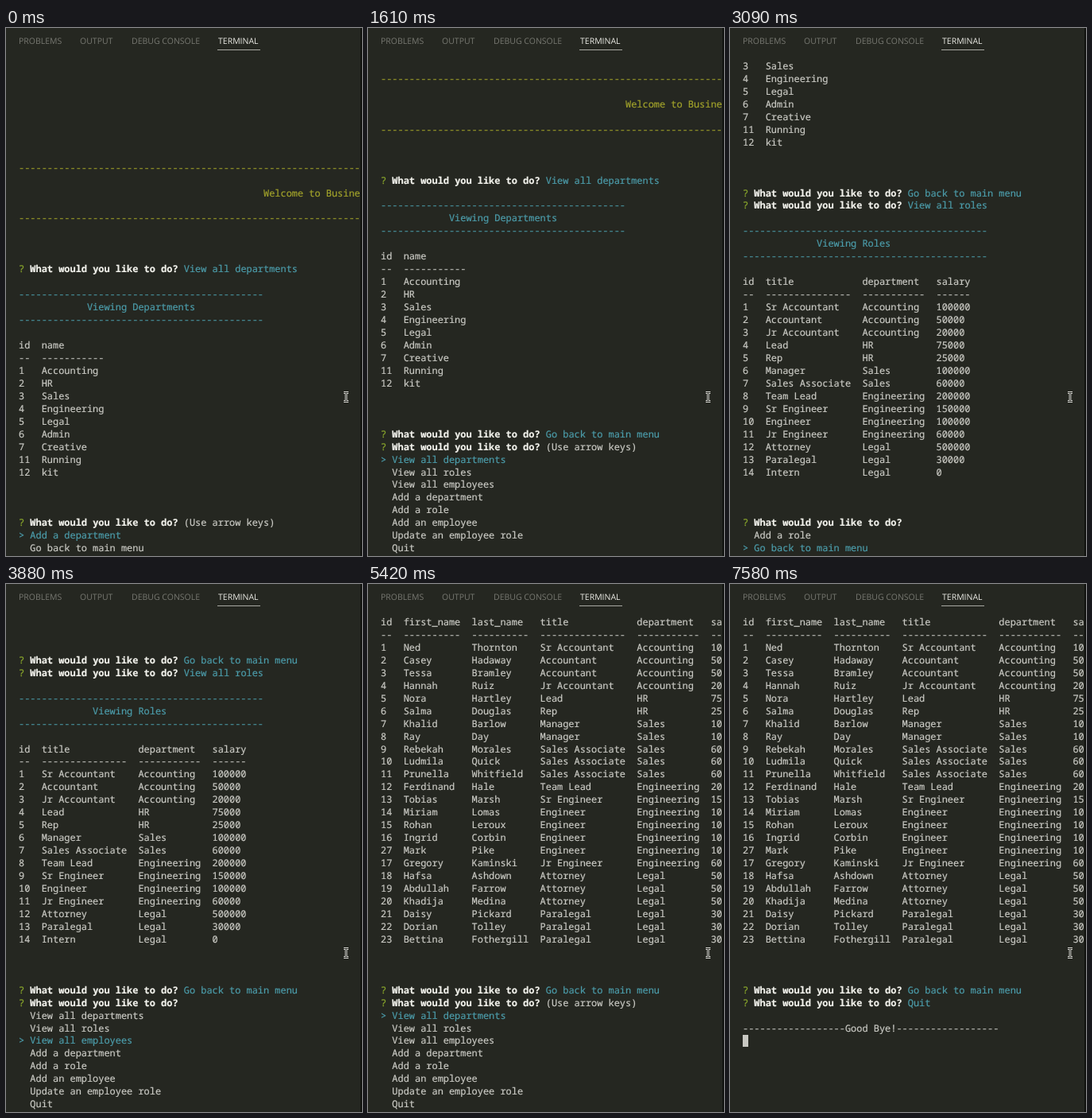
Animation, 448 px wide and 664 px high, one loop 7610 ms. Source, as an HTML page:

```html
<!DOCTYPE html>
<html lang="en">
<head>
<meta charset="utf-8">
<title>Terminal session</title>
<style>
  html, body { margin: 0; width: 100%; height: 100%; overflow: hidden; background: #252721; }
  #stage { position: relative; width: 448px; height: 664px; overflow: hidden; text-rendering: geometricPrecision; }
  .tab { position: absolute; top: 9px; font: 10.5px/16px "Open Sans", "Noto Sans", sans-serif; color: #777871; white-space: nowrap; }
  .tab.on { color: #ececE6; }
  .rule { position: absolute; left: 266px; top: 27px; width: 54px; height: 1px; background: #a8a9a2; }
  #term {
    position: absolute; left: 16px; top: 40px; width: 430px; height: 624px; margin: 0; overflow: hidden;
    font: 11.95px/15.95px "Noto Sans Mono", "DejaVu Sans Mono", monospace; color: #cbcbc5; white-space: pre;
    font-variant-ligatures: none; -webkit-text-stroke: 0.2px;
  }
  #term b { color: #f2f2ec; font-weight: 700; }
  .y { color: #a3a42b; }
  .g { color: #8aa82c; }
  .c { color: #4c9dab; }
  .block { display: inline-block; width: 1ch; height: 15px; margin-top: 1px; background: #c8c8c2; vertical-align: top; }
  .edge { position: absolute; right: 0; top: 0; width: 2px; height: 100%; background: #10110e; }
  #mouse { position: absolute; left: 423px; top: 456px; }
</style>
</head>
<body>
<div id="stage">
  <span class="tab" style="left:16px">PROBLEMS</span>
  <span class="tab" style="left:93px">OUTPUT</span>
  <span class="tab" style="left:158px">DEBUG CONSOLE</span>
  <span class="tab on" style="left:267px">TERMINAL</span>
  <div class="rule"></div>
  <pre id="term"></pre>
  <div class="edge"></div>
  <svg id="mouse" width="10" height="17" fill="none">
    <path d="M2 2.5H8M5 2.5V13.5M2 13.5H8" stroke="#d6d6d1" stroke-width="2.8"/>
    <path d="M2 2.5H8M5 2.5V13.5M2 13.5H8" stroke="#1c1d19" stroke-width="0.9"/>
  </svg>
</div>
<script>
const LOOP = 7610, ROWS = 39;
const term = document.getElementById('term');

const paint = (cls, text) => `<span class="${cls}">${text}</span>`;
const dashes = n => '-'.repeat(n);
const blanks = n => Array(n).fill('');

function table(heads, rows) {
  const widths = heads.map((h, i) => Math.max(...[h, ...rows.map(r => r[i])].map(s => s.length)));
  const line = cells => cells.map((s, i) => s.padEnd(widths[i])).join('  ');
  return [line(heads), line(widths.map(dashes)), ...rows.map(line)];
}

const departments = ['1 Accounting', '2 HR', '3 Sales', '4 Engineering', '5 Legal',
  '6 Admin', '7 Creative', '11 Running', '12 kit'].map(s => s.split(' '));

const roles = `Sr Accountant,Accounting,100000
Accountant,Accounting,50000
Jr Accountant,Accounting,20000
Lead,HR,75000
Rep,HR,25000
Manager,Sales,100000
Sales Associate,Sales,60000
Team Lead,Engineering,200000
Sr Engineer,Engineering,150000
Engineer,Engineering,100000
Jr Engineer,Engineering,60000
Attorney,Legal,500000
Paralegal,Legal,30000
Intern,Legal,0`.split('\n').map((s, i) => [String(i + 1), ...s.split(',')]);

// id, first name, last name, role id
const employees = `1 Ned Thornton 1
2 Casey Hadaway 2
3 Tessa Bramley 2
4 Hannah Ruiz 3
5 Nora Hartley 4
6 Salma Douglas 5
7 Khalid Barlow 6
8 Ray Day 6
9 Rebekah Morales 7
10 Ludmila Quick 7
11 Prunella Whitfield 7
12 Ferdinand Hale 8
13 Tobias Marsh 9
14 Miriam Lomas 10
15 Rohan Leroux 10
16 Ingrid Corbin 10
27 Mark Pike 10
17 Gregory Kaminski 11
18 Hafsa Ashdown 12
19 Abdullah Farrow 12
20 Khadija Medina 12
21 Daisy Pickard 13
22 Dorian Tolley 13
23 Bettina Fothergill 13`.split('\n').map(s => {
  const [id, first, last, role] = s.split(' ');
  return [id, first, last, ...roles[role - 1].slice(1)];
});

const BACK = 'Go back to main menu';
const MAIN = ['View all departments', 'View all roles', 'View all employees', 'Add a department',
  'Add a role', 'Add an employee', 'Update an employee role', 'Quit'];

const log = [], shots = [];
const print = (...lines) => log.push(...lines);
const shoot = (time, lines = []) =>
  shots.push({ time, html: [...log, ...lines].slice(-ROWS).join('\n') });
const prompt = tail => paint('g', '?') + ' <b>What would you like to do?</b> ' + tail;

// times[0] shows the menu, each later time moves the choice one down
function ask(items, times) {
  times.forEach((time, pick) => shoot(time, [
    prompt(pick ? '' : '(Use arrow keys)'),
    ...items.map((s, i) => i === pick ? paint('c', '&gt; ' + s) : '  ' + s)
  ]));
  print(prompt(paint('c', items[times.length - 1])));
}

function view(title, indent, width, heads, rows) {
  const bar = paint('c', dashes(width));
  print('', bar, paint('c', ' '.repeat(indent) + 'Viewing ' + title), bar, '',
    ...table(heads, rows), ...blanks(3));
}

const banner = paint('y', dashes(110));
print(...blanks(8), banner, '', paint('y', ' '.repeat(43) + 'Welcome to Business Directory'), '', banner,
  ...blanks(3), prompt(paint('c', MAIN[0])));
view('Departments', 12, 43, ['id', 'name'], departments);
ask(['Add a department', BACK], [0, 400]);
ask(MAIN, [1000, 1700]);
view('Roles', 13, 43, ['id', 'title', 'department', 'salary'], roles);
ask(['Add a role', BACK], [2000, 2670]);
ask(MAIN, [3180, 3480, 3720]);
view('Employees', 30, 78, ['id', 'first_name', 'last_name', 'title', 'department', 'salary'], employees);
ask(['Add an employee', 'Update an employee role', BACK], [4240, 4730, 4970]);
ask(MAIN, [5250, ...Array.from({ length: 7 }, (_, i) => 5520 + i * 220)]);
print('', dashes(18) + 'Good Bye!' + dashes(18), '<span class="block"></span>', ...blanks(5));
shoot(7150);

const start = performance.now();
let shown;
function draw() {
  const t = (performance.now() - start) % LOOP;
  const shot = shots.findLast(s => s.time <= t);
  if (shot !== shown) term.innerHTML = (shown = shot).html;
  requestAnimationFrame(draw);
}
draw();
</script>
</body>
</html>
```
